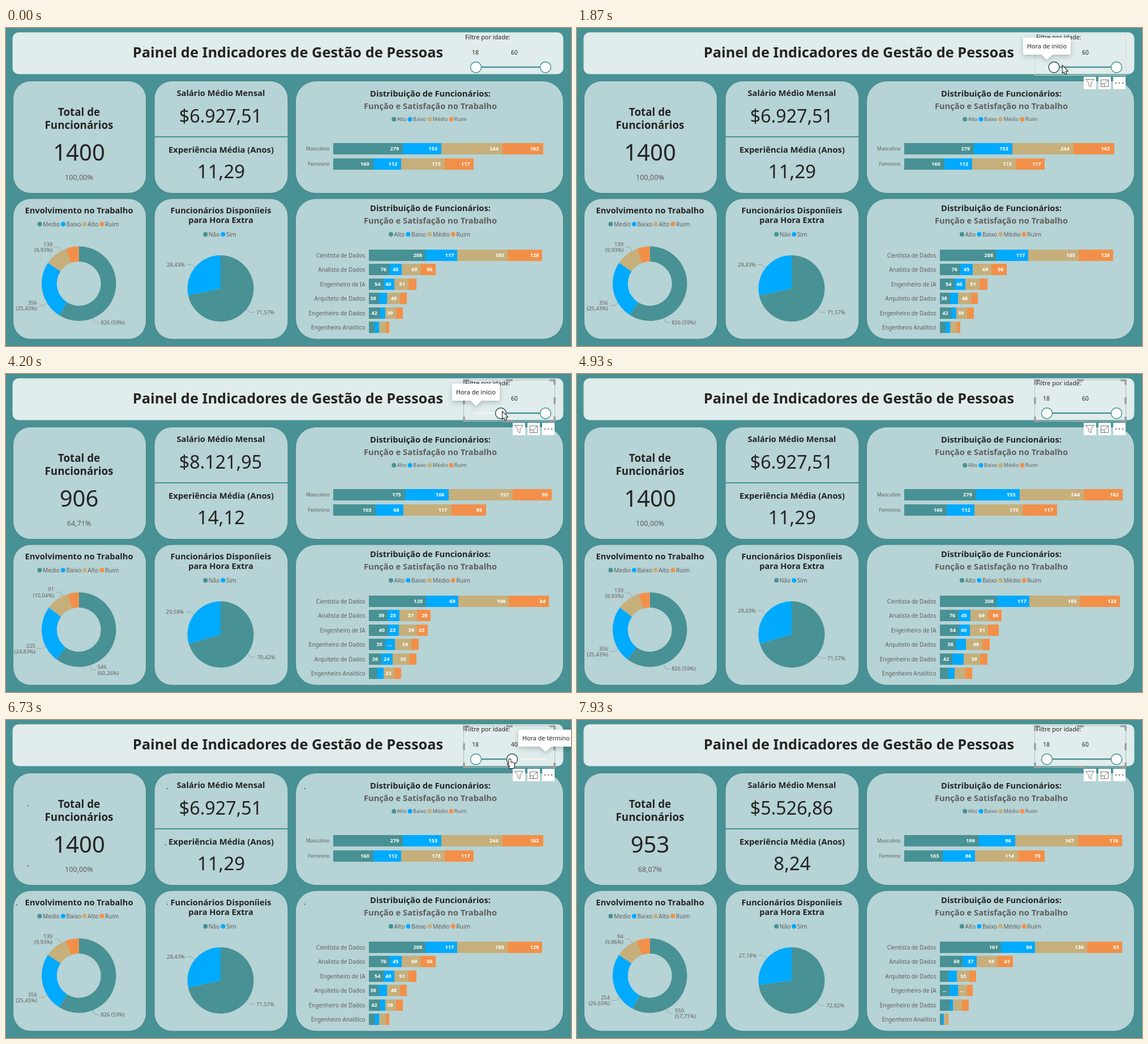
An HTML page with a canvas that plays this animation: 998x561 px, repeating every 8000 ms.

```html
<!DOCTYPE html>
<html lang="pt">
<head>
<meta charset="utf-8">
<title>Painel de Indicadores</title>
<style>
  html, body { margin: 0; width: 100%; height: 100%; overflow: hidden; background: #479194; }
  canvas { display: block; }
</style>
</head>
<body>
<canvas id="stage" width="998" height="561"></canvas>
<script>
const ctx = document.getElementById('stage').getContext('2d');
const LOOP = 8000, TAU = Math.PI * 2, STAFF = 1400;
const TEAL = '#489194', CARD = '#b6d3d5', INK = '#252423', GREY = '#605e5c';
const SERIES = [TEAL, '#00aaff', '#c6af7b', '#f29049'];
const FONT = '"Noto Sans", sans-serif';

const sum = list => list.reduce((a, b) => a + b, 0);
const lerp = (a, b, p) => a + (b - a) * p;
const within = (t, a, b) => t >= a && t < b;
const progress = (t, a, b) => Math.min(1, Math.max(0, (t - a) / (b - a)));
const easeOut = p => 1 - (1 - p) ** 3;
const percent = share => (share * 100).toFixed(2).replace('.', ',') + '%';

// The rest of each dashboard state follows from the totals by level
function snapshot({ salary, years, noOvertime, men, women, roles, involvement, widths }) {
  const byLevel = men.map((m, i) => m + women[i]);
  const total = sum(byLevel);
  const rows = Object.values(roles);
  const lastRow = byLevel.map((n, i) => n - sum(rows.map(row => row[i])));
  return {
    salary, years, total,
    genders: { names: ['Masculino', 'Feminino'], rows: [men, women], scale: widths[0] / sum(men) },
    roles: { names: [...Object.keys(roles), 'Engenheiro Analitico'], rows: [...rows, lastRow],
             scale: widths[1] / sum(rows[0]) },
    donut: [...involvement, total - sum(involvement)].map(n => n / total),
    pie: [noOvertime, 1 - noOvertime]
  };
}

const ALL = snapshot({
  salary: '$6.927,51', years: '11,29', noOvertime: 0.7157,
  men: [279, 153, 244, 162], women: [160, 112, 173, 117],
  roles: {
    'Cientista de Dados': [208, 117, 185, 128],
    'Analista de Dados': [76, 45, 69, 56],
    'Engenheiro de IA': [54, 40, 51, 31],
    'Arquiteto de Dados': [38, 28, 48, 25],
    'Engenheiro de Dados': [42, 19, 39, 25]
  },
  involvement: [826, 356, 139], widths: [370.5, 306]
});
const OLDER = snapshot({
  salary: '$8.121,95', years: '14,12', noOvertime: 0.7042,
  men: [175, 106, 157, 95], women: [103, 68, 117, 85],
  roles: {
    'Cientista de Dados': [120, 69, 106, 84],
    'Analista de Dados': [39, 25, 37, 29],
    'Engenheiro de IA': [40, 23, 39, 22],
    'Engenheiro de Dados': [35, 20, 34, 16],
    'Arquiteto de Dados': [26, 24, 35, 15]
  },
  involvement: [546, 225, 91], widths: [386, 317.5]
});
const YOUNGER = snapshot({
  salary: '$5.526,86', years: '8,24', noOvertime: 0.7282,
  men: [199, 96, 167, 118], women: [103, 86, 114, 70],
  roles: {
    'Cientista de Dados': [161, 90, 136, 93],
    'Analista de Dados': [60, 37, 55, 41],
    'Arquiteto de Dados': [23, 21, 33, 18],
    'Engenheiro de IA': [25, 22, 25, 14],
    'Engenheiro de Dados': [27, 7, 24, 18]
  },
  involvement: [550, 254, 94], widths: [385, 322]
});

const UPDATES = [
  { load: 3270, start: 3400, end: 3670, from: ALL, to: OLDER },
  { load: 4800, start: 4930, end: 5200, from: OLDER, to: ALL },
  { load: 6730, start: 6800, end: 7000, from: ALL, to: YOUNGER }
];

function text(str, x, y, size, { color = INK, align = 'center', weight = 400 } = {}) {
  ctx.font = `${weight} ${size}px ${FONT}`;
  ctx.fillStyle = color;
  ctx.textAlign = align;
  ctx.fillText(str, x, y);
}

const heading = (str, x, y, size = 14.65, color = INK) => text(str, x, y, size, { color, weight: 700 });

function panel(x, y, w, h, r, fill, stroke) {
  ctx.beginPath();
  ctx.roundRect(x, y, w, h, r);
  ctx.fillStyle = fill;
  ctx.fill();
  ctx.strokeStyle = stroke;
  ctx.lineWidth = 1;
  ctx.stroke();
}

function dot(x, y, r, fill) {
  ctx.beginPath();
  ctx.arc(x, y, r, 0, TAU);
  ctx.fillStyle = fill;
  ctx.fill();
}

function line(stroke, width, ...points) {
  ctx.beginPath();
  points.forEach(([x, y]) => ctx.lineTo(x, y));
  ctx.strokeStyle = stroke;
  ctx.lineWidth = width;
  ctx.stroke();
}

function legend(names, cx, y, size) {
  const lead = 9.5, gap = 2;
  ctx.font = `${size}px ${FONT}`;
  const widths = names.map(name => ctx.measureText(name).width + lead + gap);
  let x = cx - (sum(widths) - gap) / 2;
  names.forEach((name, i) => {
    dot(x + 4, y, 4, SERIES[i]);
    text(name, x + lead, y + size * 0.37, size, { color: GREY, align: 'left' });
    x += widths[i];
  });
}

function slices(shares, cx, cy, outer, inner) {
  let angle = -TAU / 4;
  shares.forEach((share, i) => {
    const next = angle + share * TAU;
    ctx.beginPath();
    ctx.arc(cx, cy, outer, angle, next);
    ctx.arc(cx, cy, inner, next, angle, true);
    ctx.fillStyle = SERIES[i];
    ctx.fill();
    angle = next;
  });
}

// A leader line leaves the circle at the given fraction of a turn
function callout(lines, cx, cy, radius, turn) {
  const ux = Math.sin(turn * TAU), uy = -Math.cos(turn * TAU), side = Math.sign(ux);
  const ex = cx + ux * (radius + 8), ey = cy + uy * (radius + 8);
  line('#9aa5a6', 1, [cx + ux * radius, cy + uy * radius], [ex, ey], [ex + 8 * side, ey]);
  const x = ex + 11 * side, size = 9.4;
  ctx.font = `${size}px ${FONT}`;
  lines.forEach((str, i) => {
    const clipped = side < 0 && x - ctx.measureText(str).width < 14;
    text(clipped ? str.slice(0, 6) + '...)' : str, x, ey + 3.5 + (i - (lines.length - 1) / 2) * 10.6,
      size, { color: GREY, align: side > 0 ? 'left' : 'right' });
  });
}

function donutLines(share, total) {
  const lines = [String(Math.round(share * total)), `(${percent(share).replace(',00', '')})`];
  const joined = lines.join(' ');
  return joined.length < 10 ? [joined] : lines;
}

function barLabel(value, width) {
  if (width > 18.2) return String(value);
  return width > 16.7 && width < 17 ? '...' : '';
}

function bars(from, to, p, { x, y, pitch, size, pad }) {
  to.rows.forEach((row, r) => {
    const top = Math.round(y + r * pitch);
    text(to.names[r], x - 6.5, top + 10 + size * 0.38, size, { color: GREY, align: 'right' });
    let left = x;
    row.forEach((value, i) => {
      const right = left + lerp(from.rows[r][i] * from.scale, value * to.scale, p);
      ctx.fillStyle = SERIES[i];
      ctx.fillRect(Math.round(left), top, Math.round(right) - Math.round(left), 20);
      text(barLabel(value, value * to.scale), right - pad, top + 13.4, 9.2,
        { color: '#fff', align: 'right', weight: 600 });
      left = right;
    });
  });
}

function drawCards() {
  ctx.fillStyle = TEAL;
  ctx.fillRect(0, 0, 998, 561);
  panel(12, 8, 972, 73, 10, '#e0edec', '#cfe2e2');
  for (const [x, w] of [[12.5, 235], [262, 236], [511.5, 473]])
    for (const [y, h] of [[93.5, 198], [301, 248]])
      panel(x, y, w, h, w > 400 ? 36 : 31, CARD, '#438488');
  line(TEAL, 2, [262, 192], [498, 192]);

  heading('Painel de Indicadores de Gestão de Pessoas', 498, 51.5, 25.4);
  heading('Total de', 129, 155, 18.8);
  heading('Funcionários', 129, 177.5, 18.8);
  heading('Salário Médio Mensal', 379.5, 119.5);
  heading('Experiência Média (Anos)', 380, 219.5, 14.85);
  heading('Envolvimento no Trabalho', 129, 326.5);
  heading('Funcionários Disponíieis', 379.5, 326.5);
  heading('para Hora Extra', 379.5, 344);
  for (const y of [120.5, 322.5]) {
    heading('Distribuição de Funcionários:', 749.5, y);
    heading('Função e Satisfação no Trabalho', 749.5, y + 22, 14.7, GREY);
  }
  const levels = ['Alto', 'Baixo', 'Médio', 'Ruim'];
  legend(levels, 747.5, 161, 9);
  legend(levels, 748, 364, 10.2);
  legend(['Medio', 'Baixo', 'Alto', 'Ruim'], 127.5, 346, 10.2);
  legend(['Não', 'Sim'], 377.5, 364, 10.2);
}

function drawData(t) {
  const update = UPDATES.findLast(u => t >= u.start);
  const from = update ? update.from : ALL, to = update ? update.to : ALL;
  const p = update ? easeOut(progress(t, update.start, update.end)) : 1;
  const mix = key => to[key].map((share, i) => lerp(from[key][i], share, p));

  text(String(to.total), 129, 233.5, 40);
  text(percent(to.total / STAFF), 129, 268, 12.6, { color: GREY });
  text(to.salary, 379, 167, 32.3);
  text(to.years, 380, 265, 33);
  bars(from.genders, to.genders, p, { x: 578, y: 203, pitch: 27.3, size: 8.7, pad: 7 });
  bars(from.roles, to.roles, p, { x: 641, y: 391, pitch: 25.4, size: 9.9, pad: 5.5 });

  slices(mix('donut'), 128.7, 451, 65.7, 39);
  const [medium, low] = to.donut;
  [medium - 0.15, medium + 0.073, medium + low + 0.075].forEach((turn, i) =>
    callout(donutLines(to.donut[i], to.total), 129, 451, 66, turn));

  slices(mix('pie'), 379, 459.5, 58.5, 0);
  const [no, yes] = to.pie;
  callout([percent(no)], 379, 459.5, 59, no / 2);
  callout([percent(yes)], 379, 459.5, 59, no + yes / 2);
}

function drawLoading(t) {
  const update = UPDATES.find(u => within(t, u.load, u.start));
  if (!update) return;
  const drift = (t - update.load) * 0.06;
  const spot = (x, y) => dot(x + drift, y, 1.1, '#4c5a5b');
  for (const x of [285, 528]) for (const y of [121, 325]) spot(x, y);
  for (const y of [151, 257]) spot(39, y);
  spot(282, 220);
  spot(19, 326);
}

function drawFrame(selected) {
  ctx.strokeStyle = selected ? '#b4bcbc' : '#d3dcdc';
  ctx.lineWidth = 1;
  ctx.strokeRect(808.5, 10.5, 161, 73);
  if (!selected) return;
  // Short grips at the corners and at the middle of each side
  const grip = '#9d9f9f';
  for (const sx of [-1, 1]) {
    const x = 889 + 80 * sx;
    line(grip, 3.5, [x, 41], [x, 53]);
    for (const sy of [-1, 1]) {
      const y = 47 + 36 * sy;
      line(grip, 3.5, [x - 9 * sx, y], [x, y], [x, y - 8 * sy]);
      line(grip, 3.5, [883, y], [895, y]);
    }
  }
}

function drawIcons() {
  const ink = '#777';
  ctx.fillStyle = '#fff';
  for (const x of [895, 921, 947]) ctx.fillRect(x, 86, 22, 22);
  line(ink, 1, [898.5, 90.5], [913.5, 90.5], [908, 97], [908, 104], [904, 101.5], [904, 97], [898.5, 90.5]);
  ctx.strokeRect(925.5, 91.5, 13, 12);
  ctx.strokeRect(925.5, 98.5, 6, 5);
  line(ink, 1, [932, 98], [938, 92]);
  for (const x of [952, 958, 964]) dot(x, 97, 1.2, ink);
}

function drawSlider(t, hoverLeft, hoverRight) {
  const left = t < 4600 ? lerp(830, 874, progress(t, 1670, 2130) ** 1.5) : 830;
  const right = t < 7800 ? lerp(953, 894, progress(t, 5930, 6530)) : 953;
  const age = x => String(Math.round(18 + (x - 830) / 123 * 42));
  text('Filtre por idade:', 811, 20, 10.8, { align: 'left' });
  text(age(left), 829, 47, 10.3);
  text(age(right), 898, 47, 10.3);
  line('#f4f5f5', 3, [827, 69], [954, 69]);
  line(TEAL, 2.6, [left, 69], [right, 69]);
  for (const [x, hover] of [[left, hoverLeft], [right, hoverRight]]) {
    dot(x, 69.3, 9.5, '#fff');
    ctx.strokeStyle = hover ? '#2c5759' : TEAL;
    ctx.lineWidth = 1.5;
    ctx.stroke();
  }
}

function drawTooltip(label, x, w, tip) {
  ctx.save();
  ctx.shadowColor = 'rgba(0,0,0,.22)';
  ctx.shadowBlur = 10;
  ctx.shadowOffsetY = 3;
  ctx.fillStyle = '#fff';
  ctx.beginPath();
  ctx.roundRect(x, 17, w, 30, 2);
  ctx.moveTo(tip - 10, 47);
  ctx.lineTo(tip, 56);
  ctx.lineTo(tip + 10, 47);
  ctx.fill();
  ctx.restore();
  text(label, x + 7, 36.2, 10.8, { align: 'left' });
}

function pointerAt(t) {
  const glide = (a, b, from, to) => {
    const p = progress(t, a, b);
    return [lerp(from[0], to[0], p), lerp(from[1], to[1], p)];
  };
  const icons = [905, 112], start = [831, 67], dragged = [877, 67], end = [949, 66], exit = [980, 10];
  if (within(t, 270, 1070)) return glide(270, 930, [250, 556], icons);
  if (within(t, 1070, 1670)) return glide(1070, 1470, icons, start);
  if (within(t, 1670, 4200)) return [lerp(start[0], dragged[0], progress(t, 1670, 2130) ** 0.65), 67];
  if (within(t, 4200, 4480)) return glide(4200, 4480, dragged, [900, 8]);
  if (within(t, 5300, 5930)) return glide(5300, 5600, exit, end);
  if (within(t, 5930, 7400)) return glide(5930, 6530, end, [890, 69]);
  if (within(t, 7400, 7620)) return glide(7400, 7620, [890, 69], exit);
}

function drawPointer(t) {
  const at = pointerAt(t);
  if (!at) return;
  ctx.save();
  ctx.translate(...at);
  ctx.beginPath();
  ctx.fillStyle = '#fff';
  ctx.strokeStyle = '#111';
  ctx.lineWidth = 2;
  if (within(t, 2100, 3600) || within(t, 5570, 7450)) {
    ctx.roundRect(-1.5, 0, 3, 12, 1.5);
    ctx.roundRect(-2, 6, 10, 10, 3);
    ctx.moveTo(-4, 9);
    ctx.lineTo(0, 15);
    ctx.lineTo(0, 9);
  } else {
    for (const [x, y] of [[0, 0], [0, 12], [2.8, 9.5], [4.8, 14], [6.8, 13], [4.9, 8.8], [8.6, 8.6]])
      ctx.lineTo(x, y);
  }
  ctx.closePath();
  ctx.stroke();
  ctx.fill();
  ctx.restore();
}

function render(t) {
  const startTip = within(t, 1670, 4280), endTip = within(t, 5600, 7470);
  drawCards();
  drawData(t);
  drawLoading(t);
  if (t >= 1270) {
    drawFrame(t >= 2800);
    drawIcons();
  }
  drawSlider(t, startTip, endTip);
  if (startTip) drawTooltip('Hora de início', 788, 84, 830);
  if (endTip) drawTooltip('Hora de término', 905, 97, 953);
  drawPointer(t);
}

let origin;
function tick(now) {
  origin ??= now;
  render((now - origin) % LOOP);
  requestAnimationFrame(tick);
}
render(0);
requestAnimationFrame(tick);
</script>
</body>
</html>
```
